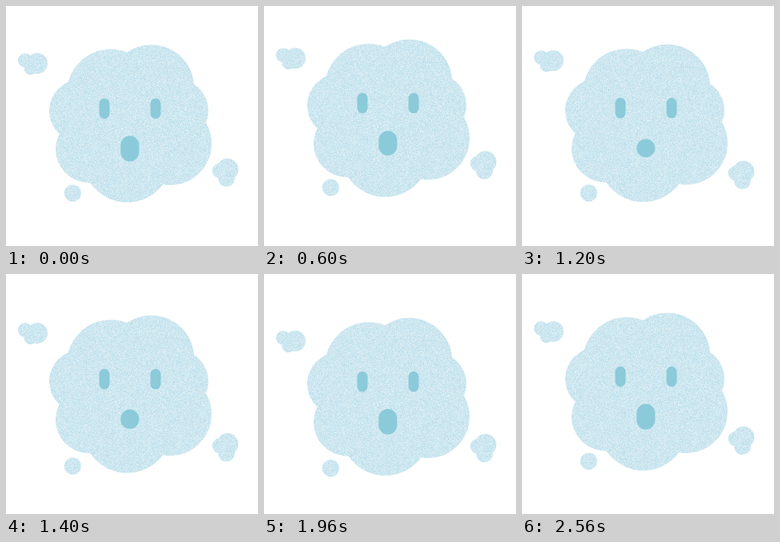
These frames come from a looping animation (315 by 300 pixels, 2.6 s). An HTML page with a canvas:

```html
<!DOCTYPE html>
<html lang="en">
<head>
<meta charset="utf-8">
<title>Surprised cloud</title>
<style>
html, body { margin: 0; height: 100%; overflow: hidden; background: #fff; }
canvas { display: block; }
</style>
</head>
<body>
<canvas id="stage" width="315" height="300"></canvas>
<script>
const LOOP = 2600, STEP = 40;
const ctx = document.getElementById('stage').getContext('2d');
const grain = makeGrain(320);

// Pale blue paper grain, the same on every load.
function makeGrain(size) {
  const tile = document.createElement('canvas');
  tile.width = tile.height = size;
  const g = tile.getContext('2d');
  const img = g.createImageData(size, size);
  let seed = 7;
  const random = () => (seed = (seed * 1664525 + 1013904223) % 4294967296) / 4294967296;
  for (let i = 0; i < img.data.length; i += 4) {
    const n = random() + random() - 1;
    img.data.set([205 + 25 * n, 231 + 11 * n, 240 + 7 * n, 255], i);
  }
  g.putImageData(img, 0, 0);
  return ctx.createPattern(tile, 'repeat');
}

// Smooth progress from 0 to 1 between two times.
function ease(t, from, to) {
  const p = Math.min(1, Math.max(0, (t - from) / (to - from)));
  return (1 - Math.cos(Math.PI * p)) / 2;
}

// Float up to the top, sink to the bottom, return to rest.
function bob(t, { up, down, top, bottom, start = 0, end = LOOP }) {
  return -up * ease(t, start, top) + (up + down) * ease(t, top, bottom) - down * ease(t, bottom, end);
}

function floating(offset, draw) {
  ctx.save();
  ctx.translate(0, offset);
  ctx.fillStyle = grain;
  draw();
  ctx.restore();
}

function circle(x, y, r) {
  ctx.beginPath();
  ctx.arc(x, y, r, 0, 2 * Math.PI);
  ctx.fill();
}

function pill(x, y, w, h) {
  ctx.beginPath();
  ctx.roundRect(x - w / 2, y - h / 2, w, h, w / 2);
  ctx.fill();
}

function drawBody() {
  circle(131, 109, 55);
  circle(181.7, 102, 53.5);
  circle(213, 131, 40);
  circle(205, 172, 52);
  circle(151.5, 190, 55.6);
  circle(104, 179, 42);
  circle(93.3, 131, 39.3);
}

function drawFace(t) {
  ctx.fillStyle = '#8bcad9';
  for (const side of [-1, 1]) pill(155 + 32 * side, 128.2, 13, 25.5);
  const pout = ease(t, 400, 1200) - ease(t, 1200, 2050);
  pill(154.8, 178.3, 23, 32 - 9 * pout);
}

function drawLeftPuff() {
  circle(24, 68, 9);
  circle(39, 71.8, 13);
  circle(30.5, 78, 8);
}

function drawRightPuff() {
  circle(277, 204, 13.5);
  circle(267, 206, 9.3);
  circle(275.5, 215.5, 10.5);
}

function frame(now) {
  const t = Math.floor(now % LOOP / STEP) * STEP;
  ctx.imageSmoothingEnabled = false;
  ctx.clearRect(0, 0, 315, 300);
  floating(bob(t, { up: 9, down: 12, top: 815, bottom: 1945, start: 200 }), drawLeftPuff);
  floating(bob(t, { up: 9.2, down: 12.5, top: 600, bottom: 1710, end: 2450 }), drawRightPuff);
  floating(bob(t, { up: 8.2, down: 10.8, top: 790, bottom: 1700 }), () => circle(83.5, 234, 10.6));
  floating(bob(t, { up: 7, down: 7, top: 660, bottom: 1800 }), () => {
    drawBody();
    drawFace(t);
  });
  requestAnimationFrame(frame);
}
requestAnimationFrame(frame);
</script>
</body>
</html>
```
